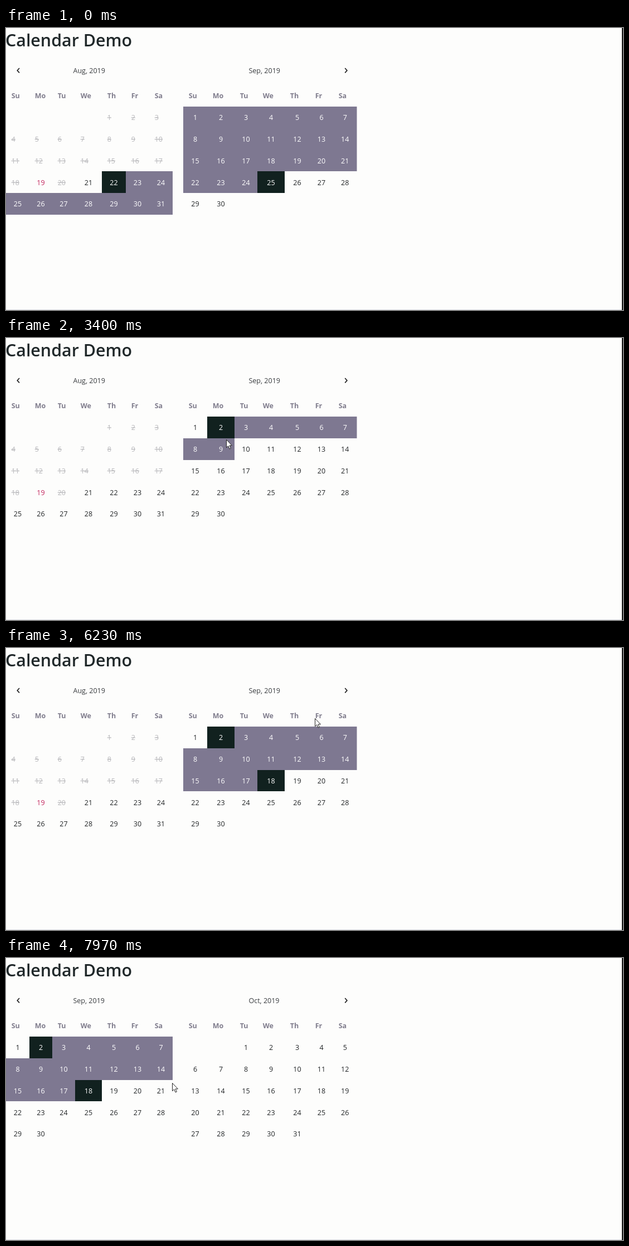
These frames come from a looping animation (1107x506 px, 8 s). An HTML page:

```html
<!DOCTYPE html>
<html lang="en">
<head>
<meta charset="utf-8">
<title>Calendar Demo</title>
<style>
  html, body { margin: 0; width: 100%; height: 100%; overflow: hidden; background: #fdfdfc; }
  svg { display: block; width: 1107px; height: 506px; }
  text { font: 12.5px "Open Sans", "Noto Sans", sans-serif; fill: #222527; }
  .title { font-size: 30.4px; font-weight: 600; fill: #20282a; }
  .month { fill: #3a3d40; }
  .weekday { font-weight: 700; fill: #807d8d; }
  .day { text-anchor: middle; }
  .past { fill: #b9b9bc; text-decoration: line-through; }
  .today { fill: #c2245c; }
  .on { fill: #fff; }
  .range { fill: #7e7891; }
  .end { fill: #11211f; }
  .chevron { fill: none; stroke: #222; stroke-width: 1.7; }
  .chevron.lit { stroke: #fff; }
  .pointer { fill: #fff; stroke: #222; stroke-width: 1; stroke-linejoin: round; }
</style>
</head>
<body>
<svg viewBox="0 0 1107 506">
  <rect width="1107" height="506" fill="#fdfdfc"/>
  <rect y="505" width="1105" height="1" fill="#dcdde4"/>
  <rect x="1105" width="2" height="506" fill="#151515"/>
  <text class="title" x="-1" y="32.5">Calendar Demo</text>
  <g id="calendar"></g>
  <g id="cursor" class="pointer">
    <path id="arrow" d="M.5 .5V14.6L3.7 11.7L6 17L8.3 16L6 10.9H10.4Z"/>
    <path id="hand" d="M-1.5 10V1.5a1.5 1.5 0 0 1 3 0V6.5q1.5-1.2 3 .3q1.6-.8 2.8.6q2-.4 2 1.6V12q0 2.5-1.6 4.5V18.5H0Q-1.5 15.5-4.6 11.5q-1.2-2 .6-2.2q1.3 0 2.5 1.8Z"/>
  </g>
</svg>
<script>
const LOOP = 8000, TOP = 141, ROW = 38.8;
const WEEKDAYS = ["Su", "Mo", "Tu", "We", "Th", "Fr", "Sa"];
const TABLES = [
  [0, 42, 83, 124, 172, 215, 257, 299],
  [318, 361, 410, 451, 500, 545, 587, 629.5]
];
const LABEL_X = [120.5, 435.5];

// offset: days counted from 1 August; lead: empty cells before day 1
const MONTHS = [
  { name: "Aug, 2019", days: 31, lead: 4, offset: 0 },
  { name: "Sep, 2019", days: 30, lead: 0, offset: 31 },
  { name: "Oct, 2019", days: 31, lead: 2, offset: 61 }
];
const TODAY = 19, LAST_BLOCKED = 20;

// time, x, y
const PATH = [
  [2800, 382, 164], [3270, 382, 164], [3400, 395, 182], [3460, 395, 182],
  [3700, 415, 204], [4190, 444, 229], [4200, 445, 230], [4265, 445, 230],
  [4630, 467, 233], [5700, 467, 233], [6225, 548, 134], [6230, 554, 126],
  [6325, 554, 126], [6330, 583, 88], [6440, 583, 88], [6670, 606, 70],
  [7700, 606, 70], [7970, 298, 224]
];

const calendar = document.getElementById("calendar");
const cursor = document.getElementById("cursor");
const arrow = document.getElementById("arrow");
const hand = document.getElementById("hand");
let drawn = "";

function cursorAt(t) {
  const next = PATH.findIndex(p => p[0] > t);
  if (next < 0) return PATH[PATH.length - 1].slice(1);
  if (next === 0) return PATH[0].slice(1);
  const [t0, x0, y0] = PATH[next - 1], [t1, x1, y1] = PATH[next];
  const k = (t - t0) / (t1 - t0);
  return [x0 + (x1 - x0) * k, y0 + (y1 - y0) * k];
}

function septemberDayAt(x, y) {
  const col = TABLES[1].findIndex((left, i) => x >= left && x < TABLES[1][i + 1]);
  return 31 + Math.floor((y - TOP) / ROW) * 7 + col + 1;
}

const label = (cls, x, y, s) => `<text class="${cls}" x="${x}" y="${y}">${s}</text>`;
const box = (cls, x, y, w, h) => `<rect class="${cls}" x="${x}" y="${y}" width="${w}" height="${h}"/>`;

function drawMonth(month, table, state) {
  const edges = TABLES[table];
  let cells = "", words = label("month", LABEL_X[table], 81, month.name);
  WEEKDAYS.forEach((name, i) => words += label("weekday", edges[i] + 9.7, 126.4, name));
  for (let d = 1; d <= month.days; d++) {
    const slot = month.lead + d - 1, col = slot % 7, row = Math.floor(slot / 7);
    const id = month.offset + d, left = edges[col], width = edges[col + 1] - left;
    const y = TOP + row * ROW, base = y + 24.2;
    const selected = id >= state.from && id <= state.to;
    if (selected) {
      const end = id === state.from || (state.done && id === state.to);
      cells += box(end ? "end" : "range", left, Math.round(y), width, Math.round(y + ROW) - Math.round(y));
    }
    if (id <= LAST_BLOCKED && id !== TODAY) {
      words += label("past", left + 9.7, base, d);
    } else {
      const cls = selected ? "day on" : id === TODAY ? "day today" : "day";
      words += label(cls, left + width / 2, base, d);
    }
  }
  return cells + words;
}

function drawCalendar(state) {
  return (state.hover ? box("end", 598, 55, 24, 39) : "") +
    drawMonth(MONTHS[state.first], 0, state) +
    drawMonth(MONTHS[state.first + 1], 1, state) +
    `<path class="chevron" d="M24 72L20.3 76.2L24 80.4"/>` +
    `<path class="chevron${state.hover ? " lit" : ""}" d="M608.2 72L611.9 76.2L608.2 80.4"/>`;
}

function render(t) {
  const [x, y] = cursorAt(t);
  const hover = x >= 598 && y >= 55 && y < 94;
  const state = { first: t < 7300 ? 0 : 1, hover, from: 33, to: 49, done: true };
  if (t < 3030) Object.assign(state, { from: 22, to: 56 });
  else if (t < 5070) Object.assign(state, { to: septemberDayAt(x, y), done: false });

  const key = JSON.stringify(state);
  if (key !== drawn) {
    calendar.innerHTML = drawCalendar(state);
    drawn = key;
  }
  cursor.style.display = t < 2800 ? "none" : "";
  cursor.setAttribute("transform", `translate(${Math.round(x)} ${Math.round(y)})`);
  arrow.style.display = hover ? "none" : "";
  hand.style.display = hover ? "" : "none";
}

const start = performance.now();
function tick() {
  render((performance.now() - start) % LOOP);
  requestAnimationFrame(tick);
}
tick();
</script>
</body>
</html>
```
